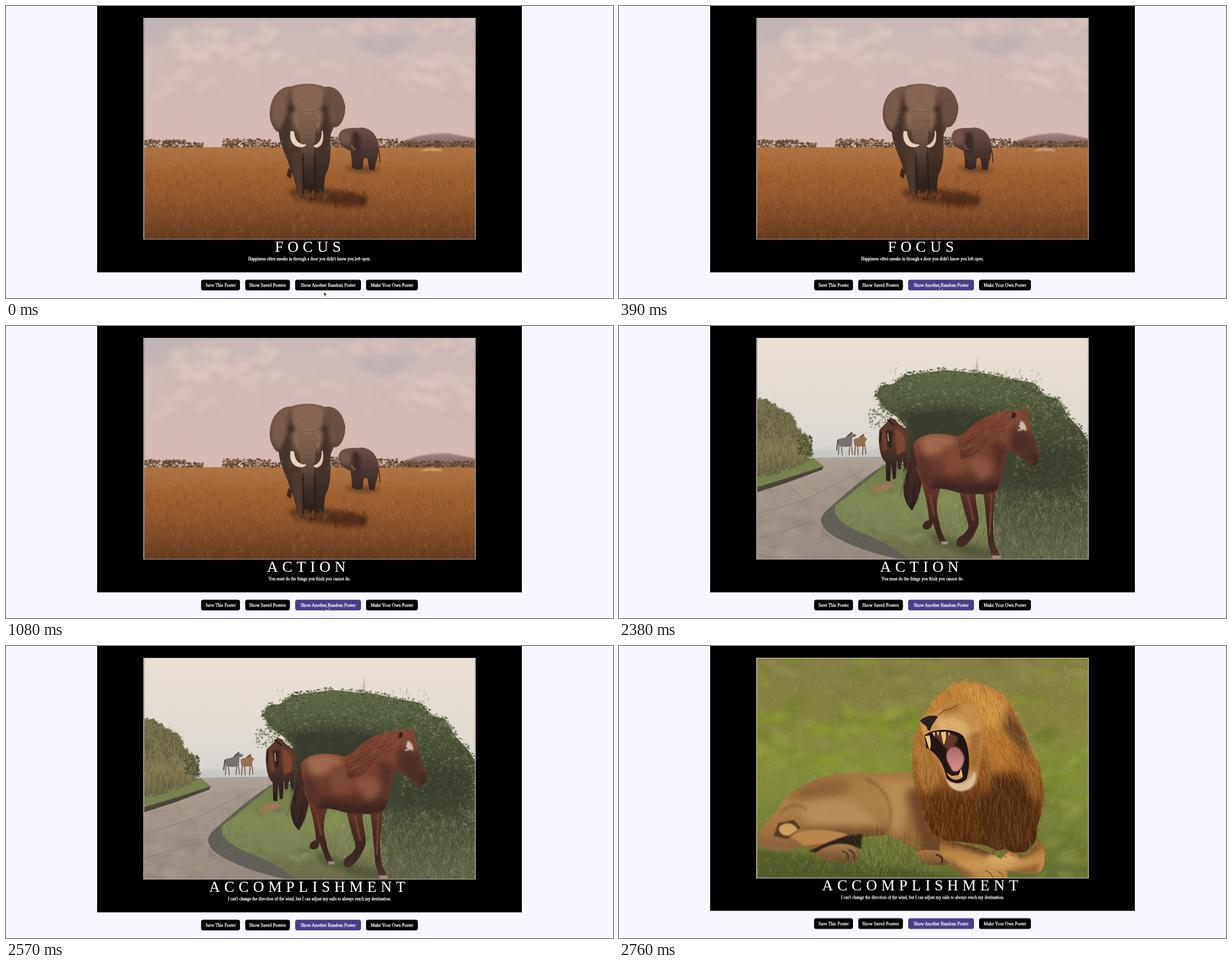
Animation, 1079 px wide and 519 px high, one loop 3.37 s. Source, as an HTML page with a canvas:

```html
<!DOCTYPE html>
<html lang="en">
<head>
<meta charset="utf-8">
<title>Motivational posters</title>
<style>
  html, body { margin: 0; width: 100%; height: 100%; overflow: hidden; background: #f8f7ff; }
  #stage { position: relative; width: 1079px; height: 519px; overflow: hidden; }
  svg, canvas { position: absolute; left: 0; top: 0; }
  canvas { left: 244px; top: 21px; }
  text { font-family: "EB Garamond", "Liberation Serif", serif; fill: #fff; stroke: #fff; }
  .title { font-size: 27px; letter-spacing: 7.55px; stroke-width: .15px; }
  .quote { font-size: 7.5px; text-anchor: middle; stroke-width: .28px; }
  .label { font-size: 8.05px; text-anchor: middle; stroke-width: .28px; }
</style>
</head>
<body>
<div id="stage">
  <svg width="1079" height="519">
    <g id="page">
      <rect x="162" y="-10" width="755" height="483.4"/>
      <g id="focus">
        <text class="title" x="478" y="437">FOCUS</text>
        <text class="quote" x="539.5" y="452">Happiness often sneaks in through a door you didn't know you left open.</text>
      </g>
      <g id="action">
        <text class="title" x="464" y="437">ACTION</text>
        <text class="quote" x="539.5" y="452">You must do the things you think you cannot do.</text>
      </g>
      <g id="accomplish">
        <text class="title" x="361" y="437">ACCOMPLISHMENT</text>
        <text class="quote" x="539.5" y="452">I can't change the direction of the wind, but I can adjust my sails to always reach my destination.</text>
      </g>
      <g id="buttons"></g>
    </g>
  </svg>
  <canvas id="elephants" width="591" height="394"></canvas>
  <canvas id="horses" width="591" height="394"></canvas>
  <canvas id="lion" width="591" height="392"></canvas>
  <svg width="1079" height="519">
    <path id="cursor" d="M0 0V7.2L1.7 5.7L2.9 8.4L4.1 7.9L2.9 5.3H5.2Z" stroke="#fff" stroke-width=".7"/>
  </svg>
</div>
<script>
const LOOP = 3370;
const NS = 'http://www.w3.org/2000/svg';
const $ = id => document.getElementById(id);

function svgEl(tag, attrs, label = '') {
  const el = document.createElementNS(NS, tag);
  for (const k in attrs) el.setAttribute(k, attrs[k]);
  el.textContent = label;
  return el;
}

// ---------- buttons ----------
[[346.8, 69.2, 'Save This Poster'], [425.3, 79.4, 'Show Saved Posters'],
 [514, 117, 'Show Another Random Poster', 'another'], [640, 92.2, 'Make Your Own Poster']
].forEach(([x, w, label, id = '']) => $('buttons').append(
  svgEl('rect', { x, y: 486.4, width: w, height: 19.2, rx: 4, ...(id && { id }) }),
  svgEl('text', { class: 'label', x: x + w / 2, y: 498.8 }, label)));

// ---------- painting helpers ----------
let g, seed;
const rnd = (a = 0, b = 1) => {
  seed = (seed * 1664525 + 1013904223) >>> 0;
  return a + (b - a) * seed / 4294967296;
};
const pick = list => list[Math.floor(rnd() * list.length)];
const UP = -Math.PI / 2, DOWN = Math.PI / 2;

function begin(id) {
  g = $(id).getContext('2d');
  g.translate(-244, -21);
  g.lineCap = 'round';
  seed = 7;
}
// A list of colours becomes a vertical gradient from y0 to y1.
function tone(c, y0, y1) {
  if (!Array.isArray(c)) return c;
  const grad = g.createLinearGradient(0, y0, 0, y1);
  c.forEach((v, i) => grad.addColorStop(i / (c.length - 1), v));
  return grad;
}
function fill(d, c, y0, y1) {
  g.fillStyle = tone(c, y0, y1);
  g.fill(new Path2D(d));
}
function line(d, c, w = 1) {
  g.strokeStyle = c;
  g.lineWidth = w;
  g.stroke(new Path2D(d));
}
function soft(blur, paint) {
  g.save();
  g.filter = `blur(${blur}px)`;
  paint();
  g.restore();
}
function inside(d, paint) {
  g.save();
  g.clip(new Path2D(d));
  paint();
  g.restore();
}
function dabs(n, [x0, y0, x1, y1], r0, r1, cols, alpha = 1, flat = .7) {
  g.globalAlpha = alpha;
  for (let i = 0; i < n; i++) {
    const r = rnd(r0, r1);
    g.fillStyle = pick(cols);
    g.beginPath();
    g.ellipse(rnd(x0, x1), rnd(y0, y1), r, r * flat, rnd(-.6, .6), 0, 7);
    g.fill();
  }
  g.globalAlpha = 1;
}
function strands(n, [x0, y0, x1, y1], len, angle, spread, cols, alpha = .5, w = .8) {
  g.globalAlpha = alpha;
  g.lineWidth = w;
  for (let i = 0; i < n; i++) {
    const x = rnd(x0, x1), y = rnd(y0, y1), a = angle + rnd(-spread, spread), l = len * rnd(.5, 1.2);
    g.strokeStyle = pick(cols);
    g.beginPath();
    g.moveTo(x, y);
    g.quadraticCurveTo(x + Math.cos(a) * l * .6, y + Math.sin(a) * l * .5, x + Math.cos(a) * l, y + Math.sin(a) * l);
    g.stroke();
  }
  g.globalAlpha = 1;
}
// Calls paint with a small box around random places on an outline.
function fringe(d, n, r, paint) {
  const path = svgEl('path', { d }), len = path.getTotalLength();
  for (let i = 0; i < n; i++) {
    const { x, y } = path.getPointAtLength(rnd(0, len));
    paint([x - r, y - r, x + r, y + r]);
  }
}
function frame(h, c, side) {
  g.fillStyle = side;
  g.fillRect(244, 21, 2, h);
  g.fillRect(833.5, 21, 1.5, h);
  g.strokeStyle = c;
  g.lineWidth = 1;
  g.strokeRect(244.5, 21.5, 590, h - 1);
}

// ---------- elephants on the plain ----------
function drawElephants() {
  begin('elephants');
  fill('M244 21H835V256H244Z', ['#c6b7b6', '#d1bcb8', '#d2bab5', '#d6bbb3'], 21, 254);
  soft(4, () => {
    dabs(45, [300, 42, 480, 92], 7, 19, ['#e2cdc4', '#dcc5be'], .5, .5);
    dabs(24, [560, 22, 835, 50], 10, 26, ['#dec8c1', '#d9c2bc'], .5, .35);
    dabs(50, [246, 90, 835, 165], 9, 30, ['#dfc7c0', '#cbb3af'], .38, .25);
    dabs(10, [246, 24, 310, 60], 14, 28, ['#bdb3b4'], .4, .5);
    dabs(9, [640, 62, 720, 82], 12, 28, ['#bcb1b3'], .5, .35);
    dabs(22, [700, 85, 830, 150], 7, 22, ['#e0cac3'], .5, .35);
  });
  soft(1, () => fill('M694 246C720 232 750 226 785 226C800 229 815 231 835 236V252H694Z', ['#a48584', '#7d6259'], 226, 250));
  fill('M244 251H835V415H244Z', ['#b07545', '#a46534', '#95582c', '#7e4a27', '#623a20'], 251, 415);
  const bush = ['#5a4434', '#6f5238', '#46352b', '#7d5a3d'];
  for (const [x0, x1, top, n] of [[246, 320, 238, 260], [322, 350, 243, 80], [385, 470, 236, 300],
    [470, 488, 243, 45], [576, 600, 233, 110], [655, 696, 236, 140], [700, 835, 240, 360]])
    dabs(n, [x0, top, x1, 251], .8, 2.6, bush, .7);
  fill('M735 258C750 250 767 250 778 258Z', '#c59a74');
  strands(900, [246, 256, 835, 300], 6, UP, .7, ['#c18143', '#b36d32', '#7c4a24', '#a35f2b'], .4, .7);
  strands(2400, [246, 300, 835, 418], 11, UP, .9, ['#b87135', '#7f461f', '#52301d', '#c28143', '#94541f'], .42, .7);
  soft(4, () => {
    fill('M500 330C530 318 590 325 640 338C650 355 620 364 590 352C560 352 520 350 500 330Z', '#4a2a1acc');
    fill('M600 287C620 282 655 284 668 292C650 299 615 298 600 287Z', '#4a2a1a99');
  });

  // smaller animal
  const calf = 'M594 224C602 214 622 218 632 216C650 217 661 231 662 250C663 266 657 278 655 292L646 291L642 270L636 271L634 289L625 291L615 288C615 275 614 265 612 257C602 254 591 246 591 231Z';
  fill(calf, ['#6b5048', '#4e3932', '#30231f'], 216, 292);
  line('M661 250C663 262 666 267 664 278', '#38271f', 1.5);
  inside(calf, () => soft(2, () => {
    fill('M594 224C604 218 614 225 613 241C606 252 592 244 591 231Z', '#725449');
    fill('M618 224C629 222 634 240 627 264L620 264C616 250 614 235 618 224Z', '#3b2a26');
  }));
  line('M614 247Q616 255 622 255', '#bfa190', 1);

  // large animal
  const body = 'M508 143C520 137 552 136 566 144C582 140 598 150 603 178C604 200 592 219 583 215L577 228C577 260 578 282 568 300C564 320 566 335 562 341C550 347 530 345 519 338C514 315 512 300 505 288C498 262 487 250 485 224C478 224 467 205 469 188C470 163 486 142 508 143Z';
  fill('M502 288L499 302L506 307L510 292Z', '#3a281f');
  fill(body, ['#745a4a', '#664d3e', '#4f3b2f', '#382a24', '#2b201d'], 138, 343);
  inside(body, () => {
    soft(3, () => {
      fill('M504 146C487 147 470 168 472 192C474 210 484 222 490 218C503 207 506 180 504 146Z', '#785b4a');
      fill('M568 147C589 143 601 162 600 184C599 202 589 214 582 211C570 198 567 172 568 147Z', '#6a5044');
      fill('M511 146C525 138 552 138 564 147C571 170 567 198 558 220L516 220C504 196 502 170 511 146Z', '#866753');
      fill('M504 150L509 175L504 225L498 275L484 230L500 190Z', '#43322a');
      fill('M565 150L572 190L577 220L570 285L552 258L564 200Z', '#443229');
      fill('M505 258L527 252V340H517Z', '#4d392d');
      fill('M503 178H513V188H503ZM560 178H569V188H560Z', '#3b2b25');
    });
    strands(420, [470, 145, 600, 260], 6, DOWN, 1.2, ['#9a7a64', '#3f2f28', '#60483b'], .25);
  });
  soft(.6, () => fill('M522 190C529 180 546 180 552 190C552 220 548 240 546 265L548 336H530C526 300 526 265 523 240C519 220 518 205 522 190Z', ['#8d6d58', '#765a49', '#403028', '#271d1b'], 182, 336));
  for (let y = 186; y < 254; y += 4.2)
    line(`M521 ${y}Q536 ${y + 4} 552 ${y}`, '#49362c88', 1);
  line('M528 262L530 337M549 265L550 337', '#1f1715', 1.5);
  fill('M506 222C503 237 509 250 523 251C530 251 533 249 534 246C522 247 513 240 512 223Z', '#e7d1c1');
  fill('M561 222C562 236 557 244 547 248C547 252 552 253 557 250C564 245 565 234 563 222Z', '#e0c6b3');
  strands(130, [512, 336, 572, 350], 11, UP, .6, ['#7a4522', '#4b2b1a', '#9a5a28'], .75);
  strands(140, [575, 335, 642, 362], 12, UP, .6, ['#3d241a', '#553019'], .6);
  frame(394, '#b9a69d', '#8d807c');
}

// ---------- horses beside the road ----------
function drawHorses() {
  begin('horses');
  fill('M244 21H835V415H244Z', ['#e9dfd4', '#e6ddd3', '#e0dad2', '#d6d4d0'], 21, 235);
  soft(3, () => fill('M340 222C380 218 430 218 480 221V236H340Z', '#c6c8c6'));
  fill('M244 292L300 268L362 250L335 240L345 234L474 232L835 235V415H244Z', ['#aea297', '#a29488', '#a09287', '#978a80'], 232, 415);
  soft(4, () => dabs(60, [246, 270, 440, 412], 8, 24, ['#b3a599', '#887c73', '#a79a8e'], .35, .3));
  strands(420, [246, 250, 440, 412], 9, -.25, .25, ['#bcb0a4', '#7f746b', '#93877c'], .3, .7);
  line('M246 334L330 309L440 254M300 283L330 309M330 309L345 348L246 378M345 350L405 383L380 414M246 404L276 414', '#75695fbb', .7);

  // left bank
  fill('M244 268L345 234L366 251L300 275L244 290Z', '#778250');
  fill('M244 287L300 270L362 250L362 255L300 278L244 296Z', '#4c443a');
  const bank = 'M244 132L262 129L272 139L290 150L308 158L317 182L336 200L343 228L325 246L290 257L244 268Z';
  const scrub = ['#6d6b4b', '#54553b', '#8d8663', '#7c7754', '#464a33'];
  fill(bank, ['#77734f', '#6e6949', '#837a55', '#5e5c40'], 125, 268);
  fringe(bank, 170, 3, box => dabs(3, box, .6, 1.8, scrub, .75));
  inside(bank, () => {
    dabs(650, [246, 130, 344, 200], .8, 2.4, scrub, .55);
    strands(750, [244, 160, 340, 262], 12, DOWN, .5, ['#a3966c', '#4f4e36', '#91885c', '#605b3f'], .45);
  });
  dabs(160, [318, 194, 343, 230], .8, 2.4, ['#3f4630', '#555b3c'], .7);

  // verge and gravel
  fill('M474 246C440 264 395 305 372 325C346 346 362 365 400 383C435 400 470 408 500 415H560L400 340Z', '#625e58');
  const verge = 'M474 246C455 264 410 300 386 318C375 336 400 355 430 367C470 382 500 400 515 415H835V240Z';
  fill(verge, ['#6f7a48', '#808b56', '#7b8454', '#6b684a'], 250, 415);
  dabs(420, [358, 316, 430, 384], .5, 1.1, ['#8a857c', '#474541'], .45);
  fringe(verge, 220, 3, box => strands(2, box, 5, UP, .8, ['#7f8a55', '#626c42'], .6));
  inside(verge, () => {
    soft(3, () => dabs(40, [440, 280, 620, 410], 4, 14, ['#7d6a4c', '#96a062', '#55613c'], .45, .35));
    strands(1300, [380, 260, 720, 415], 5, UP, .8, ['#9ea86c', '#525f3a', '#737a49', '#87815c'], .45, .7);
  });
  soft(1, () => fill('M450 291C460 280 480 276 490 283C480 292 462 298 450 291Z', '#a07659'));

  // thicket
  const trees = 'M458 124L464 107L487 103L509 88L540 84L580 78L626 83L660 86L700 95L736 101L757 124L780 130L798 160L824 188L835 207V415H670L665 300L520 260L506 250L510 178L492 160L470 145Z';
  const leaf = ['#666f49', '#788158', '#4a5238', '#58603f', '#393f2d', '#868b66'];
  fill(trees, ['#5f6848', '#4a5138', '#3f4433', '#4c523b', '#64644a'], 80, 415);
  fringe(trees, 420, 5, box => dabs(4, box, .7, 2.2, leaf, .7));
  inside(trees, () => {
    dabs(1500, [455, 78, 800, 165], .8, 2.6, leaf, .55);
    dabs(1300, [700, 130, 835, 330], .8, 2.8, leaf, .5);
    soft(8, () => {
      fill('M505 150L600 145L680 160L680 280L520 260Z', '#34352bbb');
      fill('M740 200L820 230V320L690 300Z', '#363b2c77');
    });
    strands(320, [510, 140, 660, 250], 9, UP, 1, ['#5c6046', '#2c2f26', '#6f7055'], .3);
  });
  dabs(150, [444, 147, 486, 181], .6, 1.8, ['#67704f', '#525b40'], .65);
  line('M455 175L472 162L482 145M472 162L450 150', '#555a49', .8);
  strands(60, [480, 80, 750, 100], 8, UP, .6, ['#69704f'], .6, .6);
  strands(5, [628, 82, 644, 84], 28, UP, .25, ['#808165'], .7, .6);
  strands(1300, [668, 295, 835, 415], 13, UP, .9, ['#97967a', '#3e4433', '#aaa688', '#6b7050', '#535a40'], .5, .7);
  strands(380, [575, 325, 700, 415], 22, UP, .6, ['#a39c78', '#6c6d49', '#4f5739'], .45, .7);

  // far pair
  fill('M389 202C395 198 405 201 411 190L422 193L420 197L415 198L414 212C408 216 396 216 390 212Z', '#77716d');
  line('M391 211L390 229M395 212L397 229M410 212L409 229M413 211L415 228', '#645e5b', 1.6);
  fill('M417 202C421 198 429 200 433 193L441 201L438 205L437 212C431 216 422 215 418 211Z', '#94704f');
  line('M420 211L419 229M424 212L425 229M434 212L433 229M437 211L439 228', '#6f4f3c', 1.6);
  line('M406 196L414 189M389 203L387 220M429 197L435 193', '#3d3733', 1.8);

  // middle pair
  fill('M476 171L482 163L491 166C500 180 511 179 513 191L512 253L507 254L504 236L500 255L496 254L494 238L492 271L487 273L484 244L482 276L475 275L474 242C463 235 460 203 463 184Z', ['#57382d', '#5f3a2d', '#3a2824', '#231d1c'], 164, 277);
  soft(1.5, () => {
    fill('M491 183C504 185 511 198 508 222L494 230Z', '#7b4733');
    fill('M468 186L474 186L478 222L470 222Z', '#70432f');
    fill('M474 186L487 186L485 216L478 216Z', '#2e2220');
  });
  line('M478 191L479 204', '#b7a497', 1.8);
  line('M466 188L464 206M478 167L489 176', '#2c211f', 3);

  // runner
  soft(4, () => fill('M545 360C580 380 630 385 690 408L640 413L560 388Z', '#3f442c88'));
  fill('M530 202C512 215 516 250 508 275C502 298 510 318 521 328C529 314 536 300 540 265Z', ['#4b2e27', '#2b2020'], 205, 325);
  strands(45, [507, 240, 535, 300], 24, 1.7, .2, ['#5b3a2f', '#211918'], .6);
  const legTone = ['#66392b', '#4a2a23', '#3a2421', '#4a302a'];
  for (const leg of ['M526 250L575 280C560 312 565 335 570 350C570 362 578 375 583 386L572 388C566 375 562 360 557 349C557 360 550 364 541 360C537 352 545 346 551 345C550 325 545 300 538 280Z',
    'M604 285L634 290C632 320 642 335 639 353C632 372 624 385 611 393C600 394 596 386 604 376C615 370 624 360 620 350C615 330 608 312 604 285Z',
    'M646 285L674 280C667 298 668 310 666 328C664 350 665 370 668 388L679 412H663L656 385C654 350 651 320 646 285Z'])
    fill(leg, legTone, 280, 405);
  soft(1, () => {
    fill('M572 383H584V388H573ZM662 408H679V413H664Z', '#ab9385');
    line('M662 300L659 370M620 302L630 345M553 300L560 335', '#7b4835', 3);
  });
  const horse = 'M523 210C533 192 565 186 603 197L622 184C645 165 675 153 700 152L706 154L719 148L727 147L727 162C733 185 742 210 748 230C748 241 742 249 731 248L723 241C715 230 700 225 690 219C686 245 681 265 674 288C668 298 640 302 604 296C590 292 570 286 560 290C545 292 530 262 523 210Z';
  fill(horse, ['#7a4533', '#7a4634', '#6b3c2e', '#4a2b25'], 150, 298);
  inside(horse, () => soft(6, () => {
    fill('M533 200C560 186 585 192 600 205C585 225 555 235 540 225Z', '#a06a50');
    fill('M615 240C640 225 662 230 668 255L645 278Z', '#8c5340');
    fill('M560 270C605 282 640 282 680 276V300H550Z', '#3d2521');
    fill('M700 180L735 190L752 240L725 252L694 214Z', '#4c3028');
    fill('M530 225L528 290L560 280L548 240Z', '#55322a');
    fill('M660 200L692 216L676 270L668 235Z', '#54302a');
    fill('M575 215L610 215L620 260L580 265Z', '#7f4937');
  }));
  inside(horse, () => {
    strands(300, [525, 190, 690, 290], 8, .5, .6, ['#a66a4d', '#4d2c24'], .16);
    soft(2, () => dabs(10, [735, 230, 750, 246], 3, 6, ['#332624'], .5));
  });
  const mane = 'M602 207C617 181 645 160 682 152L708 149L718 159L700 179C680 185 665 205 648 213L630 231L608 237Z';
  fill(mane, ['#874a37', '#5e3329'], 150, 235);
  inside(mane, () => strands(260, [604, 148, 718, 232], 25, 2.5, .3, ['#a2614a', '#452823', '#764030'], .55));
  strands(45, [604, 190, 670, 220], 16, 2.2, .35, ['#6a3a2d', '#8a4e3a'], .7);
  soft(.8, () => {
    fill('M714 168C720 170 725 178 724 187L719 184L709 187Z', '#cdbbae');
    fill('M697 164L700 152L706 156L704 163Z', '#2f201d');
  });
  dabs(2, [711, 181, 712, 182], 1.5, 1.5, ['#251d1b']);
  frame(394, '#c4bbb2', '#8f8984');
}

// ---------- lion in the grass ----------
function drawLion() {
  begin('lion');
  fill('M244 21H835V413H244Z', ['#857f46', '#85833f', '#87903c', '#788238', '#626c30'], 21, 413);
  soft(5, () => {
    dabs(120, [246, 21, 835, 230], 7, 26, ['#8b9a30', '#9a9055', '#728229', '#a29a60', '#736e38'], .45, .35);
    dabs(45, [246, 110, 530, 235], 7, 24, ['#87a126', '#97a437', '#6c7e24'], .45, .4);
    dabs(45, [745, 150, 835, 410], 7, 22, ['#7f942f', '#9aa04e', '#667629'], .5, .4);
  });
  strands(3200, [244, 25, 835, 412], 8, UP, 1, ['#b3aa69', '#5b652a', '#8fa338', '#6e693a', '#c0b679', '#79872f'], .4);
  soft(5, () => fill('M246 362L430 383L620 413H244Z', '#434c2499'));

  const body = 'M246 349C246 326 268 308 282 292C294 263 330 241 374 230C405 222 470 230 536 222L590 330L584 365L535 367L480 335L432 340C414 344 422 360 428 380L390 385L354 376L335 356L300 361C275 364 252 360 246 349Z';
  fill(body, ['#a27740', '#ad8149', '#a1713d', '#805731'], 226, 380);
  inside(body, () => {
    soft(8, () => {
      fill('M300 270C325 240 375 230 415 245C395 275 345 280 300 270Z', '#8c6336');
      fill('M320 285C370 262 430 270 465 322L340 322Z', '#b98c59');
      fill('M455 240C480 255 490 310 475 335L500 330L530 240Z', '#b88b52');
      fill('M510 260L550 240L585 365L540 375Z', '#6b4526');
      fill('M330 325L480 325V345H330Z', '#6b4928');
    });
    soft(2, () => line('M440 237C470 250 491 280 480 325M288 295C300 282 320 279 333 290', '#74502b', 2));
    strands(650, [250, 230, 560, 370], 7, .2, .7, ['#c89a60', '#79542f'], .2);
  });
  soft(1, () => {
    fill('M283 315L311 309L323 323L299 343L275 338Z', '#523b25');
    fill('M285 321C298 310 312 315 318 327L303 337C292 339 282 332 285 321Z', '#cf9f60');
    fill('M246 337C253 350 284 346 307 354L300 362C269 366 248 360 246 349Z', '#8c6741');
    fill('M306 338C330 320 378 326 407 335L380 350L328 355Z', '#b98548');
    fill('M336 365C362 355 387 337 433 334L430 361C401 349 372 360 350 367Z', '#2b211a');
    fill('M346 372C365 352 397 346 420 357C434 365 431 378 424 383L400 385L375 378Z', ['#ab7e4d', '#654729'], 352, 384);
  });
  line('M397 365Q410 367 407 380M409 362Q421 367 418 378', '#382b21', 2);
  strands(300, [430, 345, 540, 412], 22, UP, .9, ['#586330', '#848b42', '#323c1e', '#a2a05a', '#4c4a2a'], .6, .7);
  strands(6, [420, 335, 500, 345], 55, UP, .25, ['#a99254'], .7, .7);

  // front legs
  fill('M528 367C544 359 570 362 587 372L592 385L577 390L540 389Z', ['#b37b41', '#6f4b2c'], 362, 390);
  line('M564 371Q578 374 574 386M577 369Q586 373 583 382', '#30231a', 2.5);
  const legs = 'M570 344C610 350 652 360 679 379C690 362 700 363 714 374C732 372 741 357 745 344C761 358 760 390 748 402C724 406 705 402 690 398L691 412H626C605 408 588 391 570 365Z';
  fill(legs, ['#8a592e', '#b8813f', '#cb9653', '#bd8a4c'], 346, 412);
  inside(legs, () => {
    soft(4, () => {
      fill('M570 344L640 350L690 375L650 372Z', '#5b3a20');
      fill('M651 378C666 365 690 363 714 378L690 392L660 390Z', '#d6a363');
      fill('M690 400L750 385L745 410H690Z', '#94642f');
      fill('M580 375L640 412H590Z', '#85592f');
      fill('M700 366L745 350V366L715 378Z', '#7f5229');
    });
    strands(380, [575, 350, 755, 412], 7, .4, .6, ['#dcae6d', '#8f6232'], .25);
  });
  line('M651 399Q661 402 665 412M674 401Q682 405 684 412M685 362Q677 370 688 375', '#7c532c', 1.4);

  // mane
  const mane = 'M575 82L594 68L612 63L640 67L660 76L681 84L690 96L704 116L719 147L731 179L746 206L751 236L755 265L751 295L744 320L741 346L724 366L702 368L688 361L672 364L651 354L615 349L580 346L556 331L542 305L538 280L527 250L521 205L523 174L528 150L541 130L553 103Z';
  fill(mane, ['#bd8239', '#bc8038', '#985c26', '#643716', '#402413'], 60, 370);
  fringe(mane, 420, 3, box => strands(1, box, 9, box[1] < 110 ? -.5 : 1.3, .6,
    box[1] < 200 ? ['#c68c42', '#a66d30', '#d39c50'] : ['#8a5526', '#5d3619', '#a36a31'], .6, 1));
  inside(mane, () => {
    soft(7, () => {
      fill('M610 70C650 70 682 90 690 120L660 165L640 115Z', '#d29747');
      fill('M692 104L730 172L726 196L684 150Z', '#5b3e22');
      fill('M639 250C670 220 715 222 740 250L732 350L690 362L630 310Z', '#4b2a14');
      fill('M545 265L580 258L635 280L650 350L565 330Z', '#56300f');
      fill('M525 155L548 180L575 242L545 265L525 230Z', '#ae7535');
      fill('M651 140L690 160L708 212L660 225Z', '#b57430');
      fill('M715 200L745 215L752 280L728 262Z', '#9a6128');
      fill('M628 215L650 205L665 250L640 270Z', '#8b501f');
    });
    strands(1100, [520, 65, 755, 235], 20, 1.2, .5, ['#e3ad5c', '#8f5a22', '#c88c3d', '#673f1a'], .34, 1);
    strands(1000, [525, 215, 755, 365], 26, 1.5, .4, ['#935926', '#38200f', '#663b15', '#ab6f2f'], .4, 1);
  });

  // face
  const face = 'M535 134C542 123 560 122 574 108C597 95 623 99 638 119C650 151 645 218 632 247C617 261 597 258 586 245L544 169Z';
  soft(2, () => fill(face, ['#c38c47', '#cf9a5b', '#b1793d', '#cfa878'], 101, 258));
  inside(face, () => {
    soft(4, () => {
      fill('M563 130C585 120 615 130 626 151L614 165L565 149Z', '#dcac6b');
      fill('M624 155L645 150L638 220L622 220Z', '#a16a32');
      fill('M574 112L606 104L610 112L580 121Z', '#a26c33');
      fill('M606 108L638 104L640 150L628 150Z', '#c68d47');
    });
    strands(420, [550, 105, 645, 250], 7, .7, .8, ['#eac281', '#96682f'], .28);
  });
  soft(1, () => fill('M580 235C598 253 622 247 632 222C638 235 631 254 614 257C598 260 588 253 580 235Z', '#d6bc92'));
  fill('M543 159C557 146 596 145 612 160C624 181 625 215 618 236C609 247 591 246 582 234C577 207 563 189 546 181Z', '#211612');
  soft(1, () => {
    fill('M560 158C574 151 596 155 603 164L593 184L583 184Z', '#65372a');
    fill('M583 188C594 172 609 179 614 199C611 220 601 227 592 221C587 208 579 203 583 188Z', ['#ac686c', '#d89192'], 180, 224);
  });
  fill('M582 225L592 231L604 229L609 219L611 233C602 241 588 239 582 225Z', '#cc985a');
  for (const d of ['M572 153L581 152C582 163 580 171 577 176Z', 'M544 160L552 159C555 170 555 180 552 185Z',
    'M557 154L562 153L561 162ZM564 153L569 152L568 160ZM584 154L588 154L588 160Z', 'M604 230L608 218L611 232Z'])
    fill(d, '#e9c27a');
  soft(.6, () => {
    fill('M535 133C542 124 558 122 567 125C562 135 555 140 553 151L548 149C549 141 540 140 535 133Z', '#29211c');
    line('M578 114Q592 112 602 105M567 123L578 115', '#6b4320', 1.5);
  });
  strands(420, [246, 372, 570, 413], 11, UP, .9, ['#848f41', '#414d25', '#a29c56', '#5f6a2d'], .5, .7);
  frame(392, '#d8d6c8', '#8b8a68');
}

drawElephants();
drawHorses();
drawLion();

// ---------- timeline: each entry is [start ms, value], held until the next ----------
const shown = (from, to) => ['opacity', [[0, from ? 0 : 1], ...(from ? [[from, 1]] : []), ...(to ? [[to, 0]] : [])]];
const at = (x, y) => `translate(${x}px, ${y}px)`;
const tracks = {
  focus: [shown(0, 1080)],
  action: [shown(1080, 2570)],
  accomplish: [shown(2570)],
  elephants: [shown(0, 1180)],
  horses: [shown(1180, 2760)],
  lion: [shown(2760)],
  another: [['fill', [[0, '#000'], [290, '#483d8b']]]],
  page: [['transform', [[0, at(0, 0)], [2760, at(0, -2.6)]]]],
  cursor: [shown(0, 2380), ['transform', [[0, at(565.2, 508.2)], [290, at(568, 503)], [390, at(570, 498.2)]]]]
};
for (const id in tracks)
  for (const [prop, steps] of tracks[id]) {
    const keys = steps.map(([t, v]) => ({ offset: t / LOOP, [prop]: v, easing: 'step-end' }));
    keys.push({ offset: 1, [prop]: steps[steps.length - 1][1] });
    $(id).animate(keys, { duration: LOOP, iterations: Infinity });
  }
</script>
</body>
</html>
```
